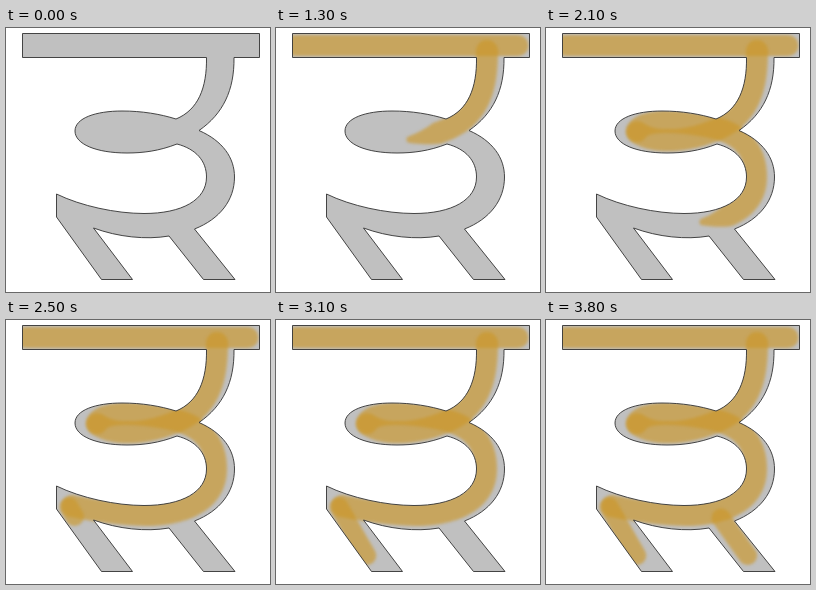
Recreate the animation shown at these times as an HTML page with a canvas. Size 264 px wide and 264 px high, loop 3900 ms.

```html
<!DOCTYPE html>
<html lang="hi">
<head>
<meta charset="utf-8">
<title>Stroke order</title>
<style>
html, body { margin: 0; height: 100%; overflow: hidden; background: #fff; }
canvas { display: block; }
</style>
</head>
<body>
<canvas width="264" height="264"></canvas>
<script>
const ctx = document.querySelector('canvas').getContext('2d');
const LOOP = 3900, STEP = 100;

const glyph = new Path2D(`M16.5 5.5H253.5V29.5H228C228.5 62 217 86 193 102.5
  C217 113 228.5 130 228.5 149C228.5 172 214 191 188.5 201L229 251.5H197.5L163 208
  C140 212 112 209 87.5 200L126.5 251.5H95.5L50.5 189V166C75 178 110 185.5 138 185.5
  C176 185.5 200.5 172 200.5 149C200.5 133 190 121 171 116C153 123 137 125 121 125
  C90 125 69 116 69 103C69 90 90 83 116 83C136 83 154 86 170 91
  C192 82 201 60 200.5 29.5H16.5Z`);

// Brush strokes: path, start and end time, radius, length of the pointed tip
const strokes = [
  ['M20 17.5H242', 0, 700, 10.5, 0],
  ['M211 23C211 60 203 90 167 103C145 112 110 118 91 104', 700, 1500, 11, 42],
  ['M91 103C97 91 130 92 165 99C198 106 210 125 210 149C210 179 183 193 145 195C115 195 85 190 66 186',
    1500, 2340, 11, 38],
  ['M63 187L91 236', 2400, 2900, 9.5, 0],
  ['M175 198L202 236', 3300, 3700, 9.5, 0]
].map(([d, start, end, radius, taper]) => {
  const path = document.createElementNS('http://www.w3.org/2000/svg', 'path');
  path.setAttribute('d', d);
  return { path, start, end, radius, taper, length: path.getTotalLength() };
});

function brush({ path, start, end, radius, taper, length }, time) {
  const progress = Math.min(1, (time - start) / (end - start));
  if (progress <= 0) return;
  const reach = progress * length;
  const shape = new Path2D();
  for (let s = 0; s <= reach; s++) {
    const { x, y } = path.getPointAtLength(s);
    const pointed = taper && progress < 1;
    const r = pointed ? radius * Math.min(1, 0.3 + (reach - s) / taper) : radius;
    shape.moveTo(x + r, y);
    shape.arc(x, y, r, 0, 2 * Math.PI);
  }
  ctx.fill(shape);
}

function draw(now) {
  const time = Math.floor(now % LOOP / STEP) * STEP;
  ctx.fillStyle = '#fff';
  ctx.fillRect(0, 0, 264, 264);
  ctx.fillStyle = '#c0c0c0';
  ctx.fill(glyph);

  ctx.save();
  ctx.clip(glyph);
  ctx.filter = 'blur(1.8px)';
  ctx.fillStyle = 'rgba(203, 151, 40, 0.64)';
  for (const stroke of strokes) brush(stroke, time);
  ctx.restore();

  ctx.strokeStyle = '#333';
  ctx.lineWidth = 0.9;
  ctx.stroke(glyph);
  requestAnimationFrame(draw);
}
requestAnimationFrame(draw);
</script>
</body>
</html>
```
